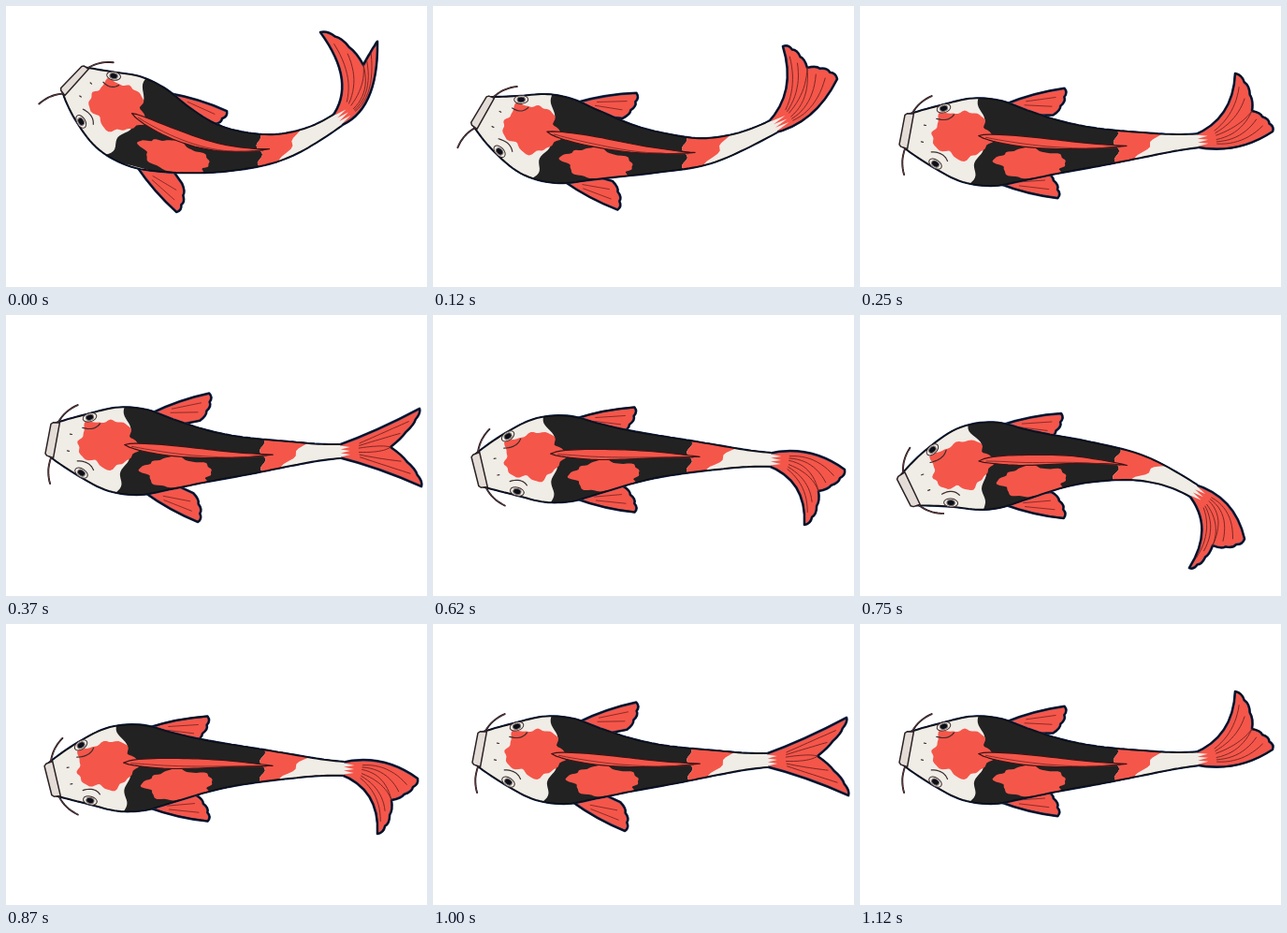
Animation of 450 by 300 pixels, one loop 1250 ms. Source, as an HTML page:

```html
<!DOCTYPE html>
<html lang="en">
<head>
<meta charset="utf-8">
<title>Koi</title>
<style>
html, body { margin: 0; width: 100%; height: 100%; overflow: hidden; background: #fff; }
svg { display: block; width: 100vw; height: 100vh; }
path { stroke-linecap: round; stroke-linejoin: round; }
</style>
</head>
<body>
<svg id="stage" viewBox="0 0 450 300"></svg>
<script>
const RED = '#f5564a', BLACK = '#222222', WHITE = '#f0ece6';
const INK = '#0d0f18', EDGE = '#1b3c78', VEIN = '#6e2422';

// spine: mouth to tail root; tail: upper tip, notch, lower tip; fins: angles in degrees.
const poses = {
  up: { spine: [[73, 79], [121, 114], [182, 142], [240, 154], [302, 148], [364, 115]],
        tail: [[336, 28], [382, 63], [397, 38]], fins: [17, 49] },
  lift: { spine: [[53, 113], [109, 137], [173, 149], [237, 156], [302, 153], [376, 122]],
          tail: [[374, 43], [400, 66], [432, 78]], fins: [-9, 28] },
  curl: { spine: [[50, 133], [114, 143], [178, 149], [242, 151], [306, 148], [370, 143]],
          tail: [[401, 72], [419, 112], [441, 134]], fins: [-15, 14] },
  flat: { spine: [[50, 133], [114, 143], [178, 149], [242, 151], [306, 148], [366, 145]],
          tail: [[442, 100], [411, 141], [444, 183]], fins: [-19, 29] },
  sink: { spine: [[50, 166], [114, 155], [178, 153], [242, 151], [306, 152], [370, 155]],
          tail: [[440, 165], [412, 188], [397, 224]], fins: [-11, 13] },
  dive: { spine: [[52, 187], [116, 164], [178, 159], [242, 157], [306, 165], [365, 193]],
          tail: [[411, 239], [377, 246], [352, 270]], fins: [-11, 13] }
};

const GAP = 64, LENGTH = 320;
const girth = [18, 33, 44.5, 45.5, 37, 28.5, 22, 17, 12.5, 8.5, 7];
const rad = a => a * Math.PI / 180;
const mix = (a, b, t) => a + (b - a) * t;
const lerp = (p, q, t) => [mix(p[0], q[0], t), mix(p[1], q[1], t)];
const polar = (p, a, r) => [p[0] + Math.cos(a) * r, p[1] + Math.sin(a) * r];
const bearing = (p, q) => Math.atan2(q[1] - p[1], q[0] - p[0]);
const dist = (p, q) => Math.hypot(q[0] - p[0], q[1] - p[1]);
const range = (n, f) => Array.from({ length: n + 1 }, (_, i) => f(i / n, i));

// Catmull-Rom through evenly spaced values, with curved ends.
function spline(v, t) {
  const n = v.length - 1, i = Math.max(0, Math.min(n - 1, Math.floor(t))), u = t - i;
  const b = v[i], c = v[i + 1];
  const a = i ? v[i - 1] : 3 * b - 3 * c + v[2];
  const d = i < n - 1 ? v[i + 2] : 3 * c - 3 * b + v[n - 2];
  return b + u * (c - a + u * (2 * a - 5 * b + 4 * c - d + u * (3 * (b - c) + d - a))) / 2;
}
const quad = (a, c, b, t) => lerp(lerp(a, c, t), lerp(c, b, t), t);
const width = s => spline(girth, s / LENGTH * (girth.length - 1));

const num = p => p.map(v => v.toFixed(1)).join(' ');
const trace = pts => 'M' + pts.map(num).join('L');
const fill = (d, c) => `<path d="${d}Z" fill="${c}"/>`;
const line = (d, w, c = INK) => `<path d="${d}" fill="none" stroke="${c}" stroke-width="${w}"/>`;
const outline = d => line(d, 2.7, EDGE) + line(d, 1.8);

// Scalloped edge from a to b, bulging away from a root point.
function rim(a, b, root, n) {
  const away = bearing(root, lerp(a, b, .5));
  const ctrl = polar(lerp(a, b, .5), away, dist(a, b) * .28);
  const pts = range(n, t => quad(a, ctrl, b, t));
  const path = pts.slice(1).map((p, i) =>
    `Q${num(polar(lerp(pts[i], p, .5), away, 4))} ${num(p)}`).join('');
  return { path, at: t => quad(a, ctrl, b, t) };
}

function koi(name, { spine, tail, fins }) {
  const xs = spine.map(p => p[0]), ys = spine.map(p => p[1]);
  const centre = s => [spline(xs, s / GAP), spline(ys, s / GAP)];
  const heading = s => bearing(centre(s - 1), centre(s + 1));
  const at = (s, d) => polar(centre(s), heading(s) + Math.PI / 2, d);
  const local = pts => trace(pts.map(p => at(...p)));

  const flank = side => range(76, t => [t * 310, side * width(t * 310)]);
  const top = flank(-1), low = flank(1);
  const frayed = range(6, (t, i) => [i % 2 ? 322 : 311, mix(-6, 6, t)]);
  const body = local([...top, ...frayed, ...[...low].reverse()]);

  // Colour patches
  const blob = (s, d, rs, rd, seed) => local(range(72, t => {
    const a = t * 2 * Math.PI;
    const r = 1 + .09 * Math.sin(5 * a + seed) + .06 * Math.sin(8 * a + 2 * seed)
      + .03 * Math.sin(15 * a);
    return [s + rs * r * Math.cos(a), d + rd * r * Math.sin(a)];
  }));
  const band = (from, to) => {
    const edge = (f, m) => range(40, t => [f(m * mix(-52, 52, t)), m * mix(-52, 52, t)]);
    return local([...edge(from, 1), ...edge(to, -1)]);
  };
  const front = d => 80 - 8 * (d / 46) ** 2 + 3 * Math.sin(d / 5);
  const saddle = d => 224 + 3 * Math.sin(d / 3);
  const rear = d => 260 - 1.1 * d + 3 * Math.sin(d / 2.5);

  // Paired fins
  const fin = side => {
    const root = at(102, side * (width(102) - 2)), back = at(134, side * (width(134) - 3));
    const a = rad(fins[side < 0 ? 0 : 1]);
    const tip = polar(root, a, 65), heel = polar(root, a - side * rad(28), 52);
    const edge = rim(tip, heel, root, 3);
    const lead = polar(lerp(root, tip, .5), a + side * Math.PI / 2, 4);
    const d = `M${num(root)}Q${num(lead)} ${num(tip)}${edge.path}L${num(back)}`;
    const veins = [.3, .7].map(t =>
      line(trace([lerp(root, edge.at(t), .35), lerp(root, edge.at(t), .85)]), .8, VEIN));
    return fill(d, RED) + outline(d) + veins.join('');
  };

  // Tail: two lobes that leave the spine at a small spread
  const hub = centre(312), aim = heading(318);
  const lobe = (tip, side) => {
    const base = at(307, side * 6), bend = polar(base, aim + side * rad(17), 46);
    return { base, bend, tip, edge: rim(tip, tail[1], hub, 3) };
  };
  const a = lobe(tail[0], -1), b = lobe(tail[2], 1);
  const back = rim(tail[1], b.tip, hub, 3);
  const tailPath = `M${num(a.base)}Q${num(a.bend)} ${num(a.tip)}${a.edge.path}${back.path}`
    + `Q${num(b.bend)} ${num(b.base)}`;
  const tailVeins = [a, b].flatMap(l => [.3, .65, 1].map(t => {
    const end = lerp(hub, l.edge.at(t), t < 1 ? .9 : 1);
    const bend = lerp(l.bend, polar(hub, aim, 42), t * .7);
    return line(trace(range(12, u => quad(hub, bend, end, mix(.25, 1, u)))), .9, VEIN);
  })).join('');

  // Dorsal fin: a long lens on the back
  const dorsalEdge = side => range(30, u =>
    [mix(76, 235, u), mix(-6, 0, u) + side * 5.5 * Math.sin(Math.PI * u ** .65)]);
  const dorsal = local([...dorsalEdge(-1), ...dorsalEdge(1).reverse()]) + 'Z';
  const ridge = local(range(20, u => [mix(84, 228, u), mix(-5, 1, u) + 2 * Math.sin(Math.PI * u)]));

  // Face
  const eye = side => {
    const turn = heading(35) * 180 / Math.PI + side * 24;
    const oval = (rx, ry, c, ink) => `<ellipse rx="${rx}" ry="${ry}" fill="${c}" stroke="${ink}"/>`;
    const crease = range(10, t => quad([29, side * 18], [42, side * 16], [47, side * 25], t));
    return `<g transform="translate(${num(at(35, side * 30))}) rotate(${turn})">`
      + oval(7.5, 4.5, WHITE, '#3a2a2a') + oval(4.2, 3, INK, '#77706e') + '</g>'
      + line(local(crease), 1.2, '#3a2d2c')
      + line(local([[17, side * 9], [19, side * 9]]), 1.2, '#3a2d2c');
  };
  const nod = heading(0);
  const barbel = side => {
    const root = at(2, side * 18);
    const a = side < 0 ? nod * .9 - rad(52) : nod * 2 + rad(72);
    const tip = polar(root, a, 29), bend = polar(root, a + side * rad(20), 15);
    const d = trace(range(10, t => quad(root, bend, tip, t)));
    return line(d, 1.9) + line(d, .6, '#a85a50');
  };
  const mouth = local([[-5, -16], [-3, -18], [4, -19], [4, 19], [-3, 18], [-5, 16]]) + 'Z';

  return `<g id="${name}" visibility="hidden">
    <clipPath id="${name}-skin"><path d="${body}Z"/></clipPath>
    ${fin(-1)}${fin(1)}
    ${fill(tailPath, RED)}${outline(tailPath)}${tailVeins}
    ${outline(local(top))}${outline(local(low))}${fill(body, WHITE)}
    <g clip-path="url(#${name}-skin)">
      ${fill(band(front, saddle), BLACK)}${fill(band(saddle, rear), RED)}
      ${fill(blob(58, -5, 31, 25, 1), RED)}${fill(blob(134, 19, 36, 16, 4), RED)}
    </g>
    ${line(local(top), 1.5)}${line(local(low), 1.5)}
    ${fill(dorsal, RED)}${line(dorsal, 1.2, '#3a1516')}${line(ridge, .8, VEIN)}
    ${eye(-1)}${eye(1)}${barbel(-1)}${barbel(1)}
    ${fill(mouth, '#e4dcd6')}${line(mouth, 1.5, '#2b2225')}
  </g>`;
}

const stage = document.getElementById('stage');
stage.innerHTML = Object.entries(poses).map(([name, pose]) => koi(name, pose)).join('');

const LOOP = 1250;
const steps = [[0, 'up'], [120, 'lift'], [250, 'curl'], [370, 'flat'], [620, 'sink'],
  [750, 'dive'], [870, 'sink'], [1000, 'flat'], [1120, 'curl']];
const start = performance.now();

function tick(now) {
  const t = Math.max(0, now - start) % LOOP;
  const shown = steps.filter(s => s[0] <= t).pop()[1];
  for (const g of stage.children)
    g.setAttribute('visibility', g.id === shown ? 'visible' : 'hidden');
  requestAnimationFrame(tick);
}
tick(start);
</script>
</body>
</html>
```
